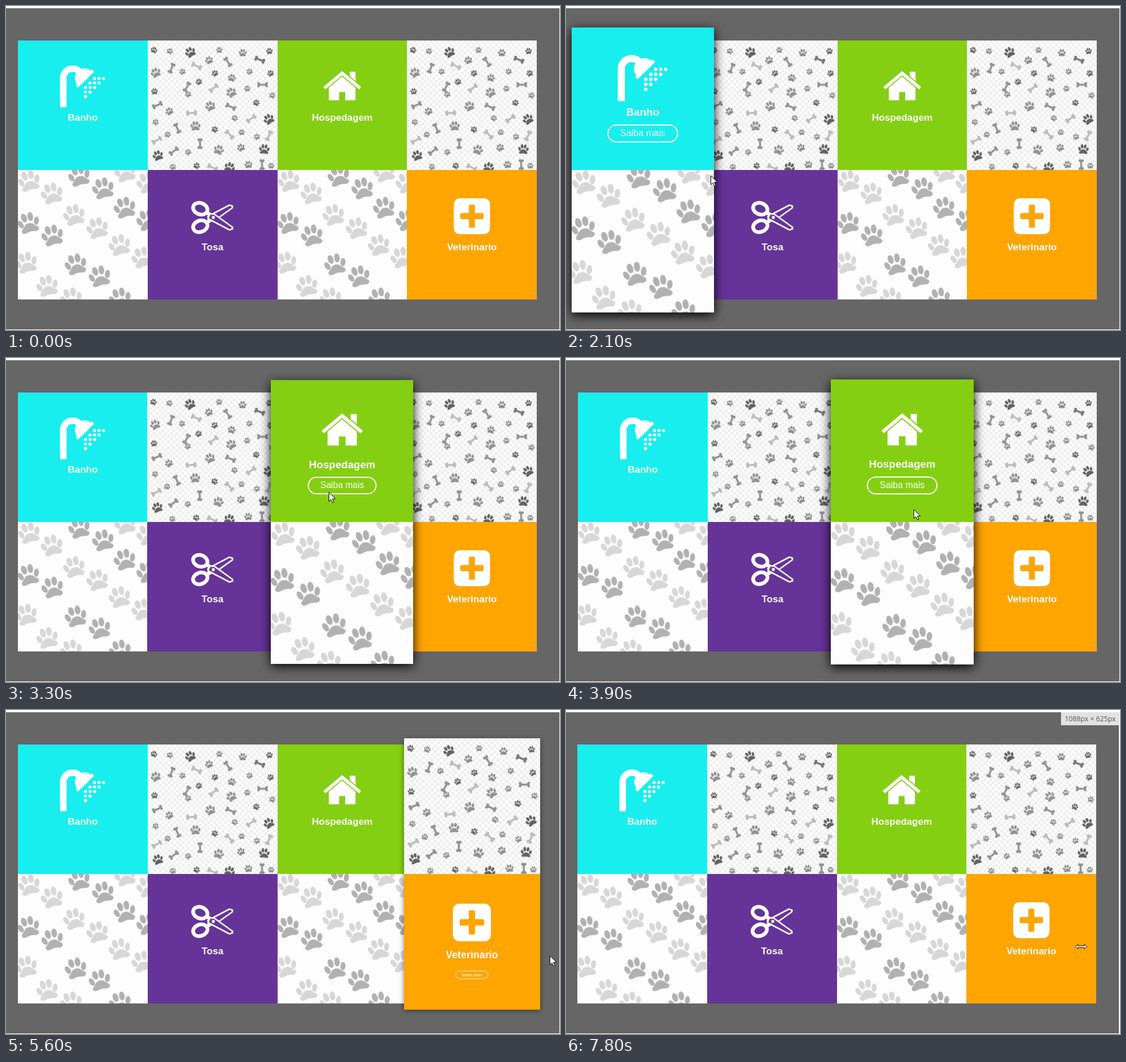
These frames come from a looping animation (977 by 573 pixels, 8 s). An HTML page with a canvas:

```html
<!DOCTYPE html>
<html lang="pt">
<head>
<meta charset="utf-8">
<title>Pet shop</title>
<style>
html, body { margin: 0; width: 100%; height: 100%; overflow: hidden; background: #fff; }
canvas { display: block; }
</style>
</head>
<body>
<canvas id="stage" width="977" height="573"></canvas>
<script>
const ctx = document.getElementById('stage').getContext('2d');
const LOOP = 8000, STEP = 100, FADE = 500;
const SIDE = 228.75, LEFT = 21, MID = 290, TAU = Math.PI * 2;
const SANS = '"Liberation Sans", Arial, sans-serif';

const lerp = (a, b, k) => a + (b - a) * k;
const clamp = v => Math.max(0, Math.min(1, v));

// cubic-bezier(.25, .1, .25, 1)
function ease(x) {
  if (x <= 0 || x >= 1) return clamp(x);
  const curve = (a, b, u) => 3 * a * u * (1 - u) ** 2 + 3 * b * u * u * (1 - u) + u ** 3;
  let lo = 0, hi = 1;
  for (let i = 0; i < 24; i++) {
    const m = (lo + hi) / 2;
    if (curve(.25, .25, m) < x) lo = m; else hi = m;
  }
  return curve(.1, 1, lo);
}

function dot(g, x, y, rx, ry = rx, rot = 0) {
  g.beginPath();
  g.ellipse(x, y, rx, ry, rot, 0, TAU);
  g.fill();
}

function poly(g, pts) {
  g.beginPath();
  pts.forEach(([x, y], i) => i ? g.lineTo(x, y) : g.moveTo(x, y));
  g.closePath();
}

// ---- pattern tiles ----

function paw(g, x, y, size, rot, color) {
  g.save();
  g.translate(x, y);
  g.rotate(rot);
  g.scale(size, size);
  g.fillStyle = color;
  g.beginPath();
  g.moveTo(0, 0);
  g.bezierCurveTo(8, 0, 9, 6, 14, 9);
  g.bezierCurveTo(19, 14, 12, 19, 6, 16);
  g.bezierCurveTo(2, 15, -2, 15, -6, 16);
  g.bezierCurveTo(-12, 19, -19, 14, -14, 9);
  g.bezierCurveTo(-9, 6, -8, 0, 0, 0);
  g.fill();
  for (const side of [-1, 1]) {
    dot(g, side * 14.5, -1, 4.5, 7.5, side * .35);
    dot(g, side * 5.8, -11, 5, 8, side * .12);
  }
  g.restore();
}

function bone(g, x, y, deg, half, color) {
  g.save();
  g.translate(x, y);
  g.rotate(deg * Math.PI / 180);
  g.fillStyle = color;
  g.fillRect(-half, -1.7, half * 2, 3.4);
  for (const sx of [-1, 1]) for (const sy of [-1, 1]) dot(g, sx * half, sy * 2.1, 2.5);
  g.restore();
}

function makeTile(paint) {
  const c = document.createElement('canvas');
  c.width = c.height = SIDE * 2;
  const g = c.getContext('2d');
  g.scale(2, 2);
  paint(g);
  return c;
}

const pawGroups = [
  { size: .47, color: '#626262', at: [[75, 21], [213, 139], [18, 203], [205, 192], [144, 224]] },
  { size: .45, color: '#929292', at: [[14, 57], [147, 92], [110, 116], [84, 151], [125, 193]] },
  { size: .35, color: '#8c8c8c', at: [[167, 22], [108, 35], [38, 125], [164, 189], [177, 219], [148, 66]] },
  { size: .29, color: '#686868', at: [[11, 17], [214, 19], [90, 73], [118, 58], [216, 58], [12, 90],
    [191, 110], [118, 157], [86, 221]] },
  { size: .28, color: '#909090', at: [[39, 19], [126, 17], [61, 55], [179, 55], [71, 95], [175, 85], [219, 97],
    [153, 137], [14, 144], [35, 166], [165, 162], [192, 170], [71, 197], [44, 223], [217, 221]] },
];
const boneGroups = [
  { color: '#929292', at: [[42, 49, -68], [141, 38, 55], [69, 82, -62], [202, 78, 0], [17, 114, -25],
    [146, 117, 25], [52, 155, 65], [92, 182, 90], [46, 195, -38], [201, 219, 90]] },
  { color: '#bababa', at: [[86, 45, 25], [116, 84, -40], [77, 128, -3], [182, 138, -35], [144, 166, 45],
    [16, 176, -30], [213, 168, -65], [114, 224, 25]] },
  { color: '#787878', at: [[197, 34, 22]] },
];

const smallTile = makeTile(g => {
  g.fillStyle = '#fdfdfd';
  g.fillRect(0, 0, SIDE, SIDE);
  g.fillStyle = '#efefef';
  for (let r = 0; r < 46; r++)
    for (let c = r % 2; c < 46; c += 2) g.fillRect(c * 5, r * 5, 5, 5);
  for (const { size, color, at } of pawGroups)
    at.forEach(([x, y], i) => paw(g, x, y, size, Math.sin(i * 7 + size * 9) * .6, color));
  for (const { color, at } of boneGroups)
    for (const [x, y, deg] of at) bone(g, x, y, deg, 7, color);
});

const bigTile = makeTile(g => {
  g.fillStyle = '#fdfdfd';
  g.fillRect(0, 0, SIDE, SIDE);
  const light = [[20, 20], [60, 42], [189, 3], [228, 23], [99, 80], [140, 103], [179, 133],
    [15, 164], [52, 205], [219, 155], [94, 227]];
  const dark = [[108, 11], [150, 33], [188, 67], [19, 94], [61, 116], [228, 89],
    [102, 167], [144, 188], [180, 227]];
  for (const [x, y] of light) paw(g, x, y, .98, -.25, '#d7d7d7');
  for (const [x, y] of dark) paw(g, x, y, .98, -.25, '#b1b1b1');
});

// ---- icons, drawn around the tile's middle axis ----

function shower(g) {
  g.lineWidth = 11.5;
  g.beginPath();
  g.moveTo(-34.4, 118);
  g.lineTo(-34.4, 66);
  g.arc(-18, 66, 16.4, Math.PI, -.75);
  g.stroke();
  g.beginPath();
  g.arc(3, 66, 17, Math.PI * .75, Math.PI * 1.75);
  g.fill();
  g.lineWidth = 6;
  g.beginPath();
  g.moveTo(-10.5, 81);
  g.lineTo(18, 53);
  g.stroke();
  for (let k = 0; k < 3; k++)
    for (let i = 0; i < k + 3; i++) dot(g, 4.8 + i * 8, 83 + k * 8 - i * 8, 2.8);
}

function house(g, color) {
  g.fillRect(13.5, 55, 10, 22);
  poly(g, [[-23.5, 82], [0, 61], [23.5, 82], [23.5, 105.5], [-23.5, 105.5]]);
  g.fill();
  g.fillStyle = color;
  g.fillRect(-5.3, 91, 10.6, 16);
  g.lineJoin = 'miter';
  for (const [c, w] of [[color, 9], ['#fff', 5.6]]) {
    g.strokeStyle = c;
    g.lineWidth = w;
    g.beginPath();
    g.moveTo(-31.5, 84);
    g.lineTo(0, 57.5);
    g.lineTo(31.5, 84);
    g.stroke();
  }
}

function scissors(g, color) {
  g.lineJoin = 'round';
  for (const s of [1, -1]) {
    g.save();
    g.translate(0, 84);
    g.scale(1, s);
    g.lineWidth = 6.5;
    g.beginPath();
    g.ellipse(-21.5, -15.5, 13, 10, .35, 0, TAU);
    g.stroke();
    g.beginPath();
    g.moveTo(-10, -9);
    g.lineTo(0, -2);
    g.stroke();
    g.lineWidth = 2.7;
    g.fillStyle = color;
    poly(g, [[-8, -2], [30, -22], [35.5, -20], [35, -17], [3, 6], [-5, 6]]);
    g.fill();
    g.stroke();
    g.restore();
  }
  g.fillStyle = '#fff';
  dot(g, 1.5, 84, 2.8);
}

function cross(g, color) {
  const box = (x, y, w, h, r) => { g.beginPath(); g.roundRect(x, y, w, h, r); g.fill(); };
  box(-32, 50, 64, 63.5, 11);
  g.fillStyle = color;
  box(-20.5, 76.3, 41, 10.6, 2);
  box(-5.3, 61.2, 10.6, 41, 2);
}

// ---- cards ----

const cards = [
  { label: 'Banho', color: '#18eeee', icon: shower, top: true, from: 450, to: 2110 },
  { label: 'Tosa', color: '#663399', icon: scissors, top: false, from: 2110, to: 2900 },
  { label: 'Hospedagem', color: '#84cf12', icon: house, top: true, from: 2900, to: 4450 },
  { label: 'Veterinario', color: '#ffa500', icon: cross, top: false, from: 4450, to: 5450 },
];
cards.forEach((c, i) => c.mid = LEFT + SIDE * (i + .5));

const hover = (c, t) => ease((t - c.from) / FADE) - ease((t - c.to) / FADE);
const layer = (c, t) => t >= c.from && t < c.to ? 2 : hover(c, t) > 0 ? 1 : 0;

function text(str, y, font) {
  ctx.font = font + ' ' + SANS;
  ctx.fillText(str, 0, y);
}

function drawCard(c, t, shift) {
  const p = hover(c, t), scale = 1 + p * .1, size = SIDE * scale, mid = c.mid + shift;
  const x = Math.round(mid - size / 2), w = Math.round(mid + size / 2) - x;
  const y = Math.round(MID - size), h = Math.round(MID + size) - y, half = MID - y;

  ctx.save();
  if (p > 0) {
    ctx.shadowColor = `rgba(0,0,0,${p})`;
    ctx.shadowBlur = 18 * p;
    ctx.shadowOffsetY = 5 * p;
  }
  ctx.fillStyle = c.color;
  ctx.fillRect(x, y, w, h);
  ctx.restore();

  if (c.top) ctx.drawImage(bigTile, x, MID, w, h - half);
  else ctx.drawImage(smallTile, x, y, w, half);

  ctx.save();
  ctx.translate(mid, MID);
  ctx.scale(scale, scale);
  ctx.translate(0, c.top ? -SIDE : 0);
  ctx.fillStyle = ctx.strokeStyle = '#fff';
  ctx.save();
  c.icon(ctx, c.color);
  ctx.restore();
  ctx.textAlign = 'center';
  ctx.textBaseline = 'alphabetic';
  text(c.label, 141.8, 'bold 17px');
  if (p > 0) {
    ctx.translate(0, 170);
    ctx.scale(p, p);
    ctx.lineWidth = 1.8;
    ctx.beginPath();
    ctx.roundRect(-55.8, -13.6, 111.6, 27.2, 13.6);
    ctx.stroke();
    text('Saiba mais', 4.6, '14.6px');
  }
  ctx.restore();
}

// ---- pointer ----

const track = [
  [400, 2, 250], [1000, 124, 166], [1200, 128, 170], [1300, 128, 177], [1500, 133, 222], [1600, 133, 222],
  [2100, 255, 300], [2500, 375, 339], [2600, 375, 339], [2900, 485, 300], [3400, 590, 222], [3600, 590, 222],
  [3900, 613, 268], [4400, 700, 340], [4700, 845, 466], [5000, 845, 466], [5500, 950, 440], [5900, 985, 419],
];
const hands = [[1500, 1700], [3400, 3700], [4700, 5100]];

function arrowShape() {
  poly(ctx, [[0, 0], [0, 16], [3.7, 12.6], [6.2, 18.2], [8.6, 17.1], [6.2, 11.6], [11.4, 11.4]]);
}

function handShape() {
  ctx.beginPath();
  ctx.moveTo(-2, 1);
  ctx.quadraticCurveTo(0, -2, 2, 1);
  ctx.lineTo(2, 6);
  ctx.quadraticCurveTo(8, 5.5, 10, 9);
  ctx.lineTo(9.5, 15);
  ctx.lineTo(7.5, 21);
  ctx.lineTo(-1, 21);
  ctx.lineTo(-7, 12);
  ctx.quadraticCurveTo(-6.5, 9, -2, 13);
  ctx.closePath();
}

function resizeShape() {
  poly(ctx, [[-10, 0], [-5.5, -4], [-5.5, -1.5], [5.5, -1.5], [5.5, -4],
    [10, 0], [5.5, 4], [5.5, 1.5], [-5.5, 1.5], [-5.5, 4]]);
}

function pointer(x, y, shape) {
  ctx.save();
  ctx.translate(x + .5, y);
  ctx.lineJoin = 'round';
  ctx.lineWidth = 1;
  ctx.fillStyle = '#fff';
  ctx.strokeStyle = '#000';
  shape();
  ctx.fill();
  ctx.stroke();
  ctx.restore();
}

function drawPointer(t, drag) {
  if (t >= 6500) return pointer(lerp(979, 908, drag), 418.5, resizeShape);
  const i = track.findIndex(k => k[0] > t);
  if (i < 1) return;
  const [t0, x0, y0] = track[i - 1], [t1, x1, y1] = track[i], k = (t - t0) / (t1 - t0);
  const hand = hands.some(([a, b]) => t >= a && t < b);
  pointer(lerp(x0, x1, k), lerp(y0, y1, k), hand ? handShape : arrowShape);
}

function drawSizeTag(drag) {
  ctx.fillStyle = '#e2e2e2';
  ctx.fillRect(873, 4, 103, 23);
  ctx.fillStyle = '#555';
  ctx.font = '12.3px "Open Sans", "Noto Sans", sans-serif';
  ctx.textAlign = 'center';
  ctx.textBaseline = 'alphabetic';
  ctx.fillText(`${Math.round(lerp(1090, 1088, drag))}px × 625px`, 924.5, 20);
}

function draw(t) {
  const drag = clamp((t - 7000) / 800), shift = -Math.round(drag);
  ctx.fillStyle = '#fff';
  ctx.fillRect(0, 0, 977, 573);
  ctx.fillStyle = '#666';
  ctx.fillRect(0, 4, 976 + shift, 568);
  [...cards].sort((a, b) => layer(a, t) - layer(b, t)).forEach(c => drawCard(c, t, shift));
  if (drag > 0) drawSizeTag(drag);
  drawPointer(t, drag);
}

const start = performance.now();
function tick() {
  const t = (performance.now() - start) % LOOP;
  draw(Math.floor(t / STEP) * STEP);
  requestAnimationFrame(tick);
}
ctx.imageSmoothingQuality = 'high';
tick();
</script>
</body>
</html>
```
